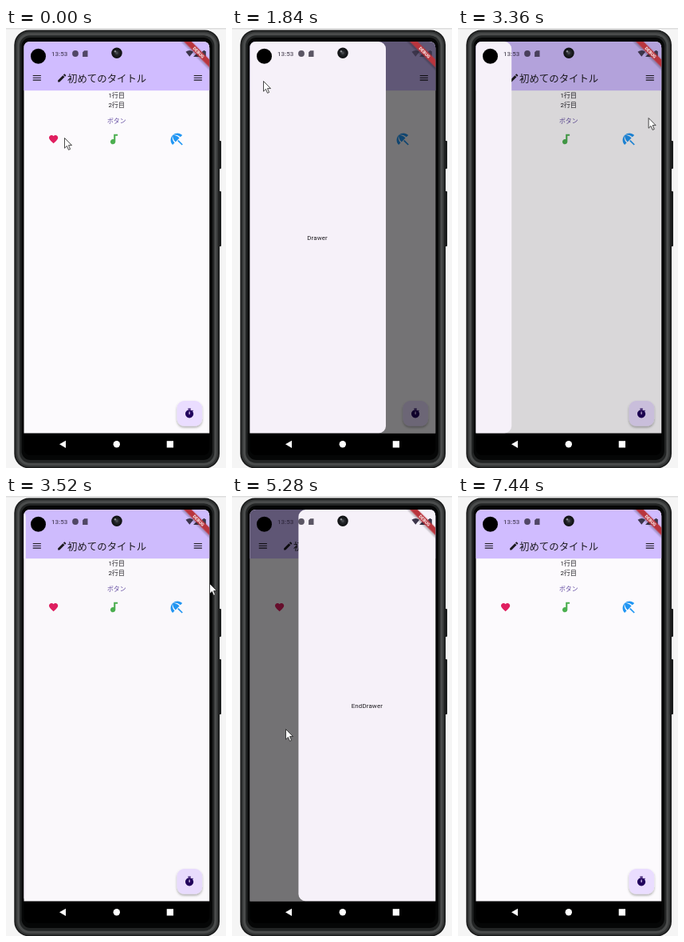
Animation of 276 by 550 pixels, one loop 7.6 s. Source, as an HTML page:

```html
<!DOCTYPE html>
<html lang="ja">
<head>
<meta charset="utf-8">
<title>Drawer demo</title>
<style>
  html, body { margin: 0; width: 100%; height: 100%; overflow: hidden; background: #f5f5f5; }
  svg { display: block; width: 276px; height: 550px; }
  text { font-family: Roboto, "Noto Sans CJK JP", "Noto Sans CJK", sans-serif; font-size: 7.9px; fill: #1d1b20; }
  .mid { text-anchor: middle; }
  .body { letter-spacing: .14px; }
</style>
</head>
<body>
<svg viewBox="0 0 276 550">
  <defs>
    <radialGradient id="lens">
      <stop offset="0" stop-color="#55585c"/>
      <stop offset=".4" stop-color="#222428"/>
      <stop offset="1" stop-color="#0c0d0f"/>
    </radialGradient>
    <filter id="shadow" x="-30%" y="-30%" width="160%" height="170%">
      <feDropShadow dx="0" dy="1.8" stdDeviation="1.8" flood-opacity=".32"/>
    </filter>
    <clipPath id="screen"><path d="M22.500 506.600V25q0-8 8-8H247.200q8 0 8 8V506.600z"/></clipPath>
    <path id="menu" d="M3 18h18v-2H3v2zm0-5h18v-2H3v2zm0-7v2h18V6H3z"/>
  </defs>

  <!-- phone body -->
  <rect width="276" height="550" fill="#f5f5f5"/>
  <rect width="276" height="1.500" fill="#dedede"/>
  <g fill="#1b1d1d">
    <rect x="266" y="141" width="4" height="35" rx="1"/>
    <rect x="266" y="204" width="4" height="69" rx="1"/>
  </g>
  <rect x="10.300" y="2.600" width="257.700" height="547.800" rx="18.500" fill="#1a1b1b"/>
  <rect x="12" y="4.300" width="254.300" height="544.400" rx="17" fill="#343636"/>
  <rect x="14" y="6.300" width="250.300" height="540.400" rx="15.500" fill="#4a4c4c"/>
  <rect x="17" y="9.300" width="244.300" height="534.400" rx="13" fill="#222424"/>
  <rect x="19.500" y="12" width="239.300" height="528" rx="11" fill="#050606"/>
  <rect x="22.500" y="17" width="232.700" height="517" rx="8" fill="#000"/>

  <g clip-path="url(#screen)">
    <rect x="22" y="16" width="234" height="491" fill="#fcfafd"/>
    <rect x="22" y="16" width="234" height="62.200" fill="#d0bcff"/>
    <g id="icons"></g>
    <text x="77" y="67.500" style="font-size:12.420px">初めてのタイトル</text>
    <text class="mid body" x="138.800" y="87">1行目</text>
    <text class="mid body" x="138.800" y="99">2行目</text>
    <text class="mid" x="138.800" y="118.800" style="fill:#6750a4;font-weight:500">ボタン</text>
    <rect x="214.500" y="466" width="31.600" height="31.600" rx="9" fill="#eaddff" filter="url(#shadow)"/>
    <g id="fabIcon"></g>

    <rect id="scrim" x="22" y="16" width="234" height="491"/>
    <g id="left">
      <rect x="10" y="17" width="184.500" height="489.500" rx="9" fill="#f6f1f9"/>
      <text class="mid body" x="108.600" y="264.800">Drawer</text>
    </g>
    <g id="right">
      <rect x="83.400" y="17" width="184.100" height="489.500" rx="9" fill="#f6f1f9"/>
      <text class="mid body" x="169.400" y="264.800">EndDrawer</text>
    </g>

    <!-- system status bar -->
    <g fill="#211b2c" fill-opacity=".72">
      <text x="57" y="35" style="font-size:8px;font-weight:500;fill:#211b2c">13:53</text>
      <circle cx="87" cy="32" r="3.900"/>
      <path d="M98.200 28.200h4.300v7.800h-6.400v-5.700z"/>
    </g>
    <g fill="#3c354b">
      <path d="M225.500 29.700q4.800-3.600 9.600 0l-4.800 6.100z"/>
      <path d="M243 28v8h-8z"/>
      <path d="M246.200 29h1.300v-1h2v1h1.300v7h-4.600z"/>
    </g>
    <g transform="translate(255.200 17) rotate(45)">
      <rect x="-30" y="15.800" width="60" height="6.800" fill="#b9343e" filter="url(#shadow)"/>
      <text class="mid" y="21.100" style="font-size:5.500px;font-weight:700;fill:#fff">DEBUG</text>
    </g>
  </g>

  <circle cx="40.500" cy="35.300" r="9.500"/>
  <circle cx="139" cy="31.200" r="6.700" fill="url(#lens)"/>
  <circle cx="137" cy="29.300" r="1.200" fill="#8b8e92"/>

  <!-- navigation bar -->
  <g fill="#fff">
    <path d="M67 520.300l8-4.600v9.200z"/>
    <circle cx="138.800" cy="520.300" r="4.200"/>
    <rect x="201.700" y="516.200" width="8.300" height="8.300"/>
  </g>

  <path id="cursor" d="M.5.5v12.700l2.900-2.800 2.100 4.900 2.100-.9-2.100-4.800h4z" fill="#fff" stroke="#1c1c1c" stroke-width=".8"/>
</svg>
<script>
const LOOP = 7600, STEP = 80, DP = 0.5645, DRAWER = 171.6;
const byId = id => document.getElementById(id);

// 24-unit glyphs, placed by centre with a size in dp
const icon = (cx, cy, dp, color, shape) => {
  const s = dp / 24 * DP;
  return `<g transform="translate(${cx - 12 * s} ${cy - 12 * s}) scale(${s})" fill="${color}">${shape}</g>`;
};
const path = d => `<path d="${d}"/>`;
const INK = '#1d1b20';
byId('icons').innerHTML = [
  icon(38.8, 62.3, 24, INK, '<use href="#menu"/>'),
  icon(240.8, 62.3, 24, INK, '<use href="#menu"/>'),
  icon(70.2, 62.5, 24, INK, path('M3 17.25V21h3.75L17.81 9.94l-3.75-3.75zM20.71 7.04c.39-.39.39-1.02 0-1.41l-2.34-2.34c-.39-.39-1.02-.39-1.41 0l-1.83 1.83 3.75 3.75z')),
  icon(59.6, 139, 24, '#e01f60', path('M12 21.35l-1.45-1.32C5.4 15.36 2 12.28 2 8.5 2 5.42 4.42 3 7.5 3c1.74 0 3.41.81 4.5 2.09C13.09 3.81 14.76 3 16.5 3 19.58 3 22 5.42 22 8.5c0 3.78-3.4 6.86-8.55 11.54z')),
  icon(135.2, 139, 30, '#4caf50', path('M12 3v9.28c-.47-.17-.97-.28-1.5-.28C8.01 12 6 14.01 6 16.5S8.01 21 10.5 21c2.31 0 4.2-1.75 4.45-4H15V6h4V3z')),
  icon(214.2, 139, 36, '#2196f3', path('M13.13 14.56l1.43-1.43L21 19.57 19.57 21zM17.42 8.83l2.86-2.86c-3.95-3.95-10.35-3.96-14.3-.02 3.93-1.3 8.31-.25 11.44 2.88zM5.95 5.98c-3.94 3.95-3.93 10.35.02 14.3l2.86-2.86C5.7 14.29 4.65 9.91 5.95 5.98zM5.97 5.96c-.38 3.01 1.17 6.88 4.29 10.03l5.73-5.73c-3.13-3.13-7.01-4.68-10.02-4.3z'))
].join('');
byId('fabIcon').innerHTML = icon(230.1, 481.8, 24, '#21005d',
  path('M9 1h6v2H9zm10.03 6.39l1.42-1.42c-.43-.51-.9-.99-1.41-1.41l-1.42 1.42C16.07 4.74 14.12 4 12 4c-4.97 0-9 4.03-9 9s4.02 9 9 9 9-4.03 9-9c0-2.12-.74-4.07-1.97-5.61zM13 14h-2V8h2z'));

// Critically damped spring going from 0 to 1
const spring = ms => {
  const x = Math.max(0, ms) * 0.0243;
  return 1 - (1 + x) * Math.exp(-x);
};
const openness = (t, open, close) => spring(t - open) * (1 - spring(t - close));

// Pointer stops: time, x, y
const STOPS = [
  [0, 73, 137], [1040, 34, 58], [1360, 34, 58], [1560, 39, 66], [2300, 39, 66],
  [2860, 216, 122], [3240, 228, 114], [3520, 255, 109], [3640, 255, 108],
  [4080, 241, 66], [4480, 241, 66], [5040, 74, 270], [5280, 67, 291],
  [6000, 67, 291], [6560, 124, 4], [6640, 130, -20], [LOOP, 130, -20]
];
const pointerAt = t => {
  const i = STOPS.findIndex(stop => stop[0] > t);
  const [t0, x0, y0] = STOPS[i - 1], [t1, x1, y1] = STOPS[i];
  const k = (t - t0) / (t1 - t0), e = k * k * (3 - 2 * k);
  return [x0 + (x1 - x0) * e, y0 + (y1 - y0) * e];
};

const slide = (id, x) => byId(id).setAttribute('transform', `translate(${x} 0)`);

function draw(t) {
  const left = openness(t, 1560, 3251);
  const right = openness(t, 4160, 5760);
  slide('left', (left - 1) * DRAWER);
  slide('right', (1 - right) * DRAWER);
  byId('left').style.display = left > 0.002 ? '' : 'none';
  byId('right').style.display = right > 0.002 ? '' : 'none';
  byId('scrim').setAttribute('opacity', 0.54 * Math.max(left, right));
  byId('cursor').setAttribute('transform', `translate(${pointerAt(t)})`);
}

const start = performance.now();
function tick() {
  const t = (performance.now() - start) % LOOP;
  draw(Math.floor(t / STEP) * STEP);
  requestAnimationFrame(tick);
}
tick();
</script>
</body>
</html>
```
